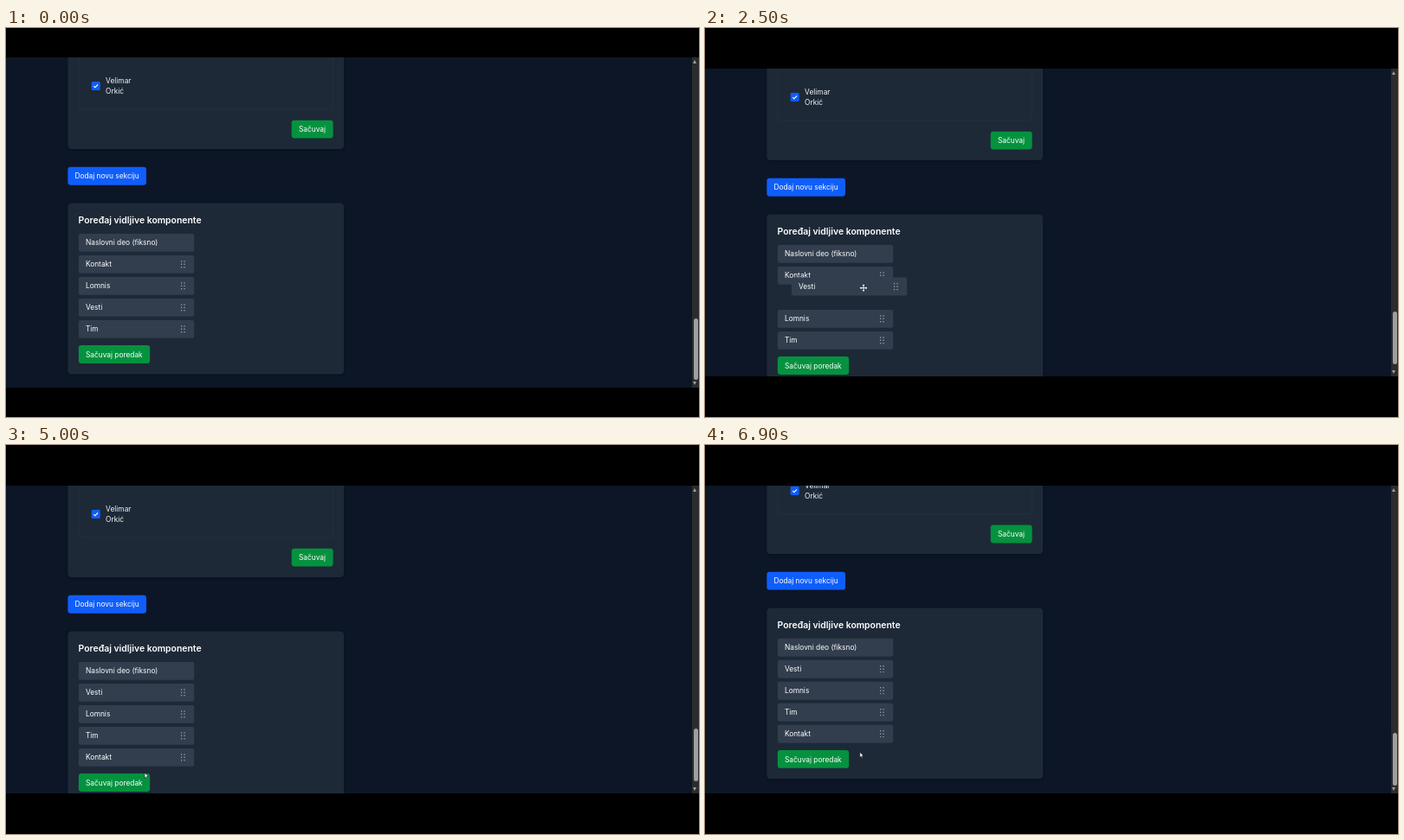
Write an HTML page that moves like this. It is 800x450 px and loops after 7000 ms.

```html
<!DOCTYPE html>
<html lang="sr-Latn">
<head>
<meta charset="utf-8">
<title>Raspored komponenti</title>
<style>
  html, body { margin: 0; width: 100%; height: 100%; overflow: hidden; background: #000; }
  #stage { position: relative; width: 800px; height: 450px; overflow: hidden; background: #000; }
  #view { position: absolute; left: 0; width: 800px; overflow: hidden; background: #0c1626; }
  /* The page is laid out 1536px wide and scaled down to the stage. */
  #page {
    position: absolute; left: 0; top: 0; width: 1536px; height: 0;
    transform-origin: 0 0;
    font: 16px/24px Inter, sans-serif; color: #f3f5f8;
  }
  #page div { position: absolute; box-sizing: border-box; white-space: nowrap; }
  #page .panel { left: 136.5px; width: 612px; background: #1d2937; border-radius: 8px; box-shadow: 0 2px 6px #0004; }
  #page .btn { height: 40px; padding: 8px 16px; border-radius: 6px; color: #fff; }
  #page .green { background: #05923f; }
  #page .green.hover { background: #04742f; }
  #page .blue { background: #0f5efb; }
  #page .frame { left: 24px; right: 24px; height: 400px; bottom: 88px; border: 1px solid #2a3748; border-radius: 8px; }
  #page .title { left: 24px; top: 24px; font-size: 20px; line-height: 28px; font-weight: 600; color: #fff; }
  #page .row { left: 24px; top: 68px; width: 256px; height: 40px; padding: 8px 16px; background: #323e4e; border-radius: 4px; color: #fff; }
  .row svg { position: absolute; left: 224px; top: 8px; fill: #a3adba; }
  #bar { position: absolute; right: 0; top: 0; width: 8px; height: 100%; background: #2b2c2d; }
  #thumb { position: absolute; left: 1.5px; width: 5px; border-radius: 2.5px; background: #9e9fa0; }
  .arrow { position: absolute; left: 1.2px; border: solid transparent; border-width: 0 2.8px; }
  .up { top: 3px; border-bottom: 4px solid #9e9fa0; }
  .down { bottom: 3px; border-top: 4px solid #9e9fa0; }
  #cursor { position: absolute; left: 0; top: 0; width: 1px; height: 1px; overflow: visible; }
</style>
</head>
<body>
<div id="stage">
  <div id="view">
    <div id="page">
      <div class="panel" style="top:-700px;height:580px">
        <div class="frame"></div>
        <svg style="position:absolute;left:52.5px;top:430px" width="20" height="20" viewBox="0 0 20 20">
          <rect width="20" height="20" rx="4" fill="#0f5efb"/>
          <path d="M5.5 10.3l3 3 6-6.3" fill="none" stroke="#fff" stroke-width="2.2"/>
        </svg>
        <div style="left:84.5px;top:416px">Velimar<br>Orkić</div>
        <div class="btn green" style="right:24px;bottom:24px">Sačuvaj</div>
      </div>
      <div class="btn blue" style="left:136.5px;top:-80px">Dodaj novu sekciju</div>
      <div class="panel" id="order" style="top:0;height:380px">
        <div class="title">Poređaj vidljive komponente</div>
        <div class="btn green" id="save" style="left:24px;top:316px">Sačuvaj poredak</div>
      </div>
    </div>
    <div id="bar">
      <div class="arrow up"></div>
      <div id="thumb"></div>
      <div class="arrow down"></div>
    </div>
  </div>
  <svg id="cursor">
    <g id="move" fill="#fff" stroke="#000" stroke-width=".6" paint-order="stroke">
      <path d="M0-4.4L1.7-2.5H.5V-.5H2.5V-1.7L4.4 0L2.5 1.7V.5H.5V2.5H1.7L0 4.4L-1.7 2.5H-.5V.5H-2.5V1.7L-4.4 0L-2.5-1.7V-.5H-.5V-2.5H-1.7Z"/>
    </g>
    <path id="hand" fill="#fff" stroke="#000" stroke-width=".5"
      d="M-.8 .5Q0-.5 .8 .5V3L4.6 3.8Q5.4 4 5.2 5L4.6 7.4V8.8H.2L-2.2 5.6Q-2.4 4.6-.8 5Z"/>
    <path id="point" fill="#fff" stroke="#000" stroke-width=".5"
      d="M0 0V6L1.4 4.8L2.3 6.9L3.3 6.4L2.4 4.4H4.2Z"/>
  </svg>
</div>
<script>
const LOOP = 7000, STEP = 100, SCALE = 800 / 1536, PITCH = 48, SETTLE = 150;
const $ = id => document.getElementById(id);
const clamp = x => Math.min(1, Math.max(0, x));
const mix = (a, b, k) => a + (b - a) * k;
const easeOut = x => 1 - (1 - clamp(x)) ** 2;
const smooth = x => (x = clamp(x), x * x * (3 - 2 * x));

// Pointer path: time, x, y in stage pixels.
const PATH = [
  [700, 300, 270], [1100, 198, 321.5], [1500, 171, 335], [1800, 167, 338],
  [2000, 167, 338], [2500, 183, 300.7], [2900, 176, 286], [3200, 169.5, 277],
  [3450, 167, 280], [3800, 162.5, 314.2], [3900, 162.5, 314.2],
  [4300, 176.5, 364.7], [4500, 174, 366], [5300, 151.7, 387],
  [6150, 151.7, 387], [6700, 178.8, 355.3], [7000, 178.8, 355.3]
];

// slots: [time, slot index] changes; drag: while the pointer holds the row.
const ROWS = [
  { text: 'Naslovni deo (fiksno)', slots: [[0, 0]], fixed: true },
  { text: 'Kontakt', slots: [[0, 1], [2750, 2], [4500, 4]], drag: [3900, 4500] },
  { text: 'Lomnis', slots: [[0, 2], [2250, 3], [4000, 2]] },
  { text: 'Vesti', slots: [[0, 3], [3450, 1]], drag: [2000, 3450] },
  { text: 'Tim', slots: [[0, 4], [4150, 3]] }
];

const dots = [4, 10.5].flatMap(x => [5.5, 12, 18.5].map(y =>
  `<circle cx="${x}" cy="${y}" r="1.4"/>`)).join('');
for (const row of ROWS) {
  row.el = document.createElement('div');
  row.el.className = 'row';
  row.el.innerHTML = row.text + (row.fixed ? '' : `<svg width="16" height="24">${dots}</svg>`);
  $('order').append(row.el);
}

function pointer(t) {
  const i = Math.max(1, PATH.findIndex(p => p[0] >= t));
  const [a, b] = [PATH[i - 1], PATH[i]];
  const k = clamp((t - a[0]) / (b[0] - a[0]));
  return [mix(a[1], b[1], k), mix(a[2], b[2], k)];
}

function dragOffset(row, t) {
  const grab = pointer(row.drag[0]);
  return pointer(t).map((v, i) => (v - grab[i]) / SCALE);
}

function rowPosition(row, t) {
  const i = row.slots.findLastIndex(s => s[0] <= t);
  const y = row.slots[i][1] * PITCH;
  if (row.drag && t >= row.drag[0] && t < row.drag[1]) {
    const [dx, dy] = dragOffset(row, t);
    return [dx, y + dy];
  }
  if (!i) return [0, y];
  const [start] = row.slots[i];
  const k = easeOut((t - start) / SETTLE);
  let from = [0, row.slots[i - 1][1] * PITCH];
  if (row.drag && start === row.drag[1]) {
    const [dx, dy] = dragOffset(row, start);
    from = [dx, from[1] + dy];
  }
  return [mix(from[0], 0, k), mix(from[1], y, k)];
}

function draw(t) {
  const shrink = easeOut(t / 400);
  const scroll = smooth((t - 6400) / 450);
  $('view').style.top = mix(34, 47, shrink) + 'px';
  $('view').style.height = mix(382, 356, shrink) + 'px';
  $('thumb').style.top = mix(302, 281, shrink) + 5 * scroll + 'px';
  $('thumb').style.height = mix(71, 60.5, shrink) + 'px';
  $('page').style.transform = `scale(${SCALE}) translateY(${323.5 - 52 * scroll}px)`;

  for (const row of ROWS) {
    const [x, y] = rowPosition(row, t);
    row.el.style.transform = `translate(${x}px, ${y}px)`;
    row.el.style.zIndex = row.drag && t >= row.drag[0] && t < row.drag[1] + SETTLE ? 2 : 1;
  }

  const kind = t < 700 ? '' : t < 1000 ? 'point' : t < 4700 ? 'move'
    : t < 5100 ? 'point' : t < 6300 ? 'hand' : 'point';
  for (const id of ['move', 'hand', 'point']) $(id).style.display = id === kind ? '' : 'none';
  $('save').classList.toggle('hover', kind === 'hand');
  const [x, y] = pointer(t);
  $('cursor').style.transform = `translate(${x}px, ${y}px)`;
}

const begin = performance.now();
function tick() {
  const t = (performance.now() - begin) % LOOP;
  draw(Math.floor(t / STEP) * STEP);
  requestAnimationFrame(tick);
}
tick();
</script>
</body>
</html>
```
